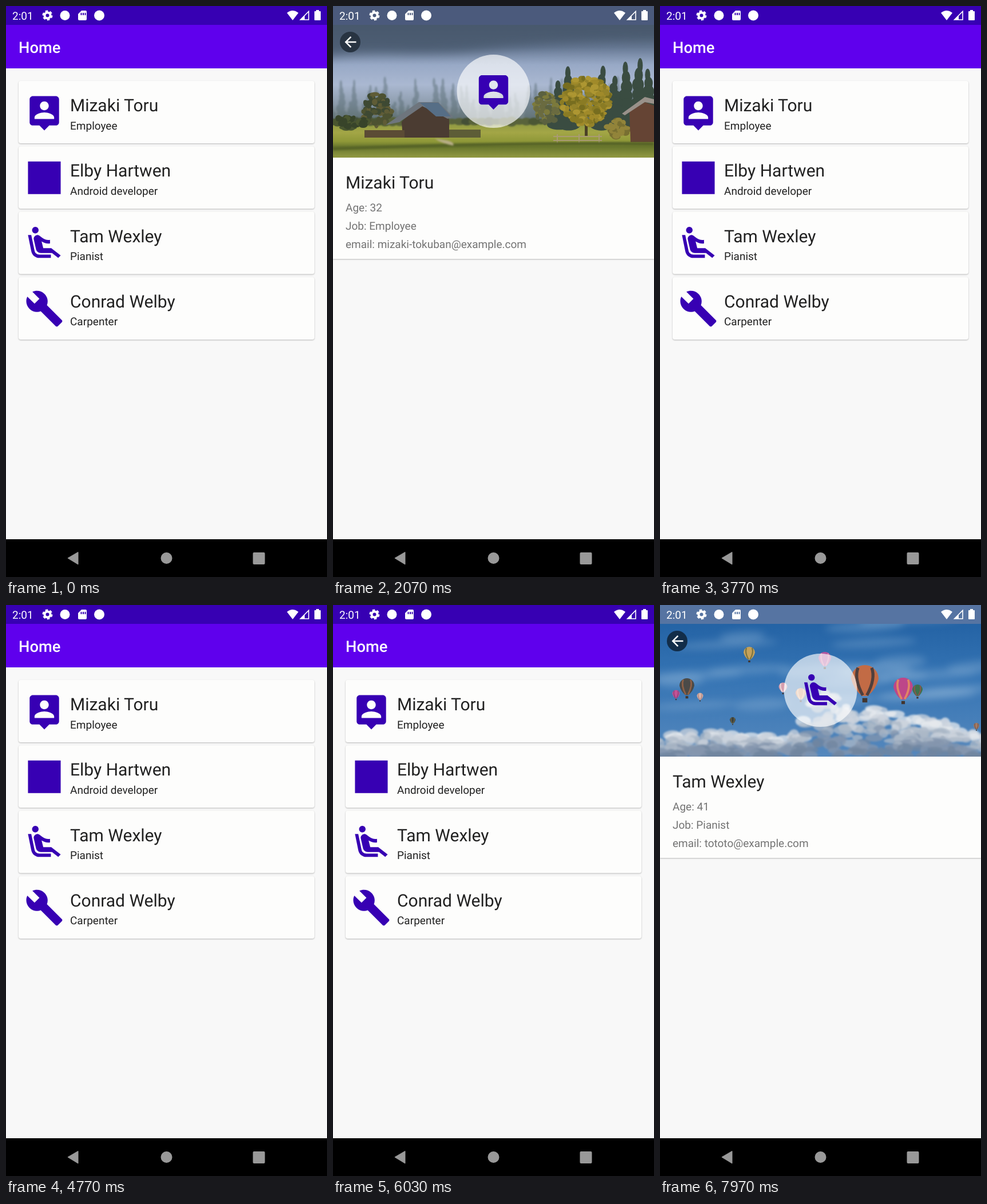
These frames come from a looping animation (561x998 px, 8 s). An HTML page:

```html
<!DOCTYPE html>
<html lang="en">
<head>
<meta charset="utf-8">
<title>Home</title>
<style>
  html, body { margin: 0; width: 100%; height: 100%; overflow: hidden; background: #000; }
  svg { display: block; width: 100%; height: 100%; }
  text { font-family: Roboto, sans-serif; font-size: 19px; fill: #212121; text-rendering: geometricPrecision; }
  .name { font-size: 30px; }
  .info { fill: #737373; }
  .card { fill: #fdfdfc; filter: drop-shadow(0 1.2px 1px #0004); }
  .icon { fill: #3700b3; }
</style>
</head>
<body>
<svg id="stage" viewBox="0 0 561 998" preserveAspectRatio="none"></svg>
<script>
const LOOP = 8000, FADE = 220, ROW = 114.3;

const people = [
  { name: 'Mizaki Toru', job: 'Employee', age: 32, mail: 'mizaki-tokuban', bar: '#4b5a7c', back: '#283442', photo: valley,
    icon: 'M19 2H5c-1.11 0-2 .9-2 2v14c0 1.1.9 2 2 2h4l3 3 3-3h4c1.1 0 2-.9 2-2V4c0-1.1-.9-2-2-2zm-7 3.3c1.49 0 2.7 1.21 2.7 2.7 0 1.49-1.21 2.7-2.7 2.7-1.49 0-2.7-1.21-2.7-2.7 0-1.49 1.21-2.7 2.7-2.7zM18 16H6v-.9c0-2 4-3.1 6-3.1s6 1.1 6 3.1v.9z' },
  { name: 'Elby Hartwen', job: 'Android developer', age: 25, mail: 'elolo', bar: '#6b5857', back: '#72706f', photo: desk,
    icon: 'M2 2h20v20H2z' },
  { name: 'Tam Wexley', job: 'Pianist', age: 41, mail: 'tototo', bar: '#5674a2', back: '#122d49', photo: sky,
    icon: 'M5.35 5.64c-.9-.64-1.12-1.88-.49-2.79.63-.9 1.88-1.12 2.79-.49.9.64 1.12 1.88.49 2.79-.64.9-1.88 1.12-2.79.49zM16 19H8.93c-1.48 0-2.74-1.08-2.96-2.54L4 7H2l1.99 9.76C4.37 19.2 6.47 21 8.94 21H16v-2zm.23-4h-4.88l-1.03-4.1c1.58.89 3.28 1.54 5.15 1.22V9.99c-1.63.31-3.44-.27-4.69-1.25L9.14 7.47c-.23-.18-.49-.3-.76-.38-.32-.09-.66-.12-.99-.06h-.02c-1.23.22-2.05 1.39-1.84 2.61l1.35 5.92C7.16 16.98 8.39 18 9.83 18h6.85l3.82 3 1.5-1.5-5.77-4.5z' },
  { name: 'Conrad Welby', job: 'Carpenter',
    icon: 'M22.7 19l-9.1-9.1c.9-2.3.4-5-1.5-6.9-2-2-5-2.4-7.4-1.3L9 6 6 9 1.6 4.7C.4 7.1.9 10.1 2.9 12.1c1.9 1.9 4.6 2.4 6.9 1.5l9.1 9.1c.4.4 1 .4 1.4 0l2.3-2.3c.5-.4.5-1.1.1-1.4z' }
];

// Detail page visits: person, opening time, closing time
const visits = [[0, 1820, 3510], [1, 4840, 5440], [2, 7130, Infinity]];

let seed = 7;
const rnd = (a, b) => {
  seed = (seed * 16807) % 2147483647;
  return a + (b - a) * seed / 2147483647;
};
const many = (n, f) => Array.from({ length: n }, (_, i) => f(i)).join('');
const rect = (x, y, w, h, fill, more = '') => `<rect x="${x}" y="${y}" width="${w}" height="${h}" fill="${fill}" ${more}/>`;
const oval = (x, y, rx, ry, fill, more = '') => `<ellipse cx="${x}" cy="${y}" rx="${rx}" ry="${ry}" fill="${fill}" ${more}/>`;
const path = (d, fill, more = '') => `<path d="${d}" fill="${fill}" ${more}/>`;
const text = (x, y, s, cls = '', more = '') => `<text x="${x}" y="${y}" class="${cls}" ${more}>${s}</text>`;
const gradient = (id, ...stops) => `<linearGradient id="${id}" x2="0" y2="1">` +
  stops.map(([at, c]) => `<stop offset="${at}" stop-color="${c}"/>`).join('') + '</linearGradient>';
const blur = (r, s) => `<g style="filter:blur(${r}px)">${s}</g>`;
const pick = list => list[Math.floor(rnd(0, list.length))];
const place = (x, y, k = 2.857) => `translate(${x - 12 * k} ${y - 12 * k}) scale(${k})`;
const rowIcon = i => [67, 186 + ROW * i];

function valley() {
  const fir = (x, y, w, h, c) => many(7, i => oval(x + rnd(-2, 2), y - h + (i + .6) * h / 7, w * (.1 + i * .06), h / 9, c));
  const bush = (x, y, w, h, colors, n) => many(n, () => {
    const a = rnd(0, 6.28), r = Math.sqrt(rnd(0, 1));
    return oval(x + Math.cos(a) * r * w, y + Math.sin(a) * r * h, rnd(3, 8), rnd(3, 6), pick(colors));
  });
  return gradient('fog', [0, '#526278'], [.17, '#687a95'], [.3, '#98a9c6'], [.45, '#aab8d1'], [.6, '#8c9bab'], [.76, '#66736c']) +
    gradient('grass', [0, '#8b9641'], [.3, '#a3a646'], [.55, '#8f9838'], [.7, '#68762d'], [1, '#929a42']) +
    rect(0, 33, 561, 232, 'url(#fog)') +
    blur(9, path('M-30 0H600V62Q500 60 400 66T250 78T110 82T-30 92Z', '#47576b', 'opacity=".8"')) +
    blur(1.5, `<g opacity=".45">${many(45, i => fir(i * 13 + rnd(-5, 5), 204, rnd(16, 26), rnd(30, 82), '#53666d'))}</g>`) +
    rect(0, 202, 561, 63, 'url(#grass)') +
    blur(1, many(45, i => oval(i * 13, 202, 10, rnd(4, 9), pick(['#4b5734', '#59633b', '#444f36'])))) +
    blur(.7,
      [[410, 104], [395, 80], [512, 112], [535, 118], [492, 88], [551, 100], [470, 105]].map(([x, h]) => fir(x, 212, 46, h, '#3a4c41')).join('') +
      bush(373, 180, 20, 28, ['#6a6b40', '#7c7a3c', '#5b6140'], 70) +
      bush(76, 182, 24, 28, ['#4d5231', '#5f5c36', '#3e4933'], 80) +
      bush(28, 204, 32, 11, ['#38442a', '#4a5630'], 45) +
      rect(440, 195, 5, 32, '#4b4126') +
      bush(442, 166, 43, 42, ['#8a7b24', '#a08a2a', '#776d1f', '#ad9632', '#94832a'], 260) +
      bush(497, 214, 18, 15, ['#92843a', '#786f31'], 40)) +
    path('M120 203L150 172L203 198V230H122Z', '#4b3c32') +
    path('M92 208L150 168H184L210 194L200 197L158 174L116 203Z', '#6e757d') +
    path('M152 169H184L206 193H180Z', '#566e86') +
    rect(55, 217, 70, 13, '#5b4b35') + rect(203, 216, 55, 14, '#5d5d37') +
    path('M518 185L545 168L561 174V238H520Z', '#654434') +
    path('M505 188L545 159L561 163V171L545 168L510 191Z', '#99918a') +
    path('M385 228H470M385 235H470M392 224V240M430 224V240M465 224V240', 'none', 'stroke="#aa9b73" stroke-width="2"') +
    blur(1.5, path('M0 247Q300 236 561 238V244Q300 241 0 252Z', '#566327') +
      path('M178 232Q215 235 210 244Q190 240 178 232Z', '#b7ad86'));
}

function desk() {
  const grain = (n, light) => many(n, () => rect(rnd(-60, 540), rnd(33, 265), rnd(20, 110), rnd(.6, 2), light ? pick(['#6d544a', '#775c50', '#5c473f']) : pick(['#2b2122', '#352a29']), 'opacity=".55"'));
  return rect(0, 33, 561, 232, '#46362f') +
    blur(.5, grain(220, false) + grain(200, true)) +
    many(6, i => rect(0, 55 + i * 39, 561, 2, '#231b1c')) +
    blur(22, path('M-60 0H620V300H-60ZM60 60V245H500V60Z', '#150f10', 'fill-rule="evenodd" opacity=".4"')) +
    path('M0 33H77L99 119Q101 127 94 132L0 181Z', '#a1a0a1') +
    path('M0 33H74L96 116Q98 123 91 127L0 174Z', '#f0f0f2') +
    path('M0 177L62 207L36 265H0Z', '#1f2023') + path('M0 177L62 207L58 215L0 188Z', '#36383c') +
    path('M411 42L424 33H537L516 100Q465 82 411 48Z', '#1d1f22') +
    path('M411 42L516 92L514 100L411 50Z', '#a7a39e') +
    oval(485, 56, 32, 32, '#141619') + oval(485, 56, 23, 23, '#2c3238') + oval(485, 56, 14, 14, '#121519') +
    path('M537 33H555L549 47L534 43Z', '#4f9ac2') +
    oval(546, 98, 19, 20, '#121315') + oval(546, 98, 14, 15, '#1c1d20') +
    `<g fill="#62554f66" stroke="#171719" stroke-width="4">
      <rect x="464" y="193" width="37" height="25" rx="10" transform="rotate(18 482 205)"/>
      <rect x="512" y="214" width="40" height="26" rx="10" transform="rotate(18 532 227)"/>
      <path d="M500 214Q508 211 514 220M463 198L459 207M466 190Q515 187 556 216" fill="none" stroke-width="2.5"/></g>` +
    rect(168, 255, 190, 20, '#fafafa', 'rx="5"') + path('M498 265Q511 254 520 265Z', '#f3f2f2');
}

function sky() {
  const balloon = ([x, y, r, c, stripe]) =>
    path(`M${x - r} ${y}a${r} ${r} 0 0 1 ${2 * r} 0Q${x + r * .8} ${y + r * .8} ${x + r * .2} ${y + r * 1.25}h${-r * .4}Q${x - r * .8} ${y + r * .8} ${x - r} ${y}Z`, c) +
    path(`M${x - r * .5} ${y - r * .8}Q${x - r * .8} ${y} ${x - r * .15} ${y + r * 1.2}M${x + r * .5} ${y - r * .8}Q${x + r * .8} ${y} ${x + r * .15} ${y + r * 1.2}`, 'none', `stroke="${stripe}" stroke-width="${r * .22}"`) +
    rect(x - r * .18, y + r * 1.4, r * .36, r * .32, '#42352e');
  const bump = (x, at, h, w) => h * Math.exp(-(((x - at) / w) ** 2));
  const top = x => 222 - bump(x, 292, 84, 42) - bump(x, 380, 46, 45) - bump(x, 470, 30, 60) - bump(x, 80, 10, 60);
  const shades = ['#e6e9ed', '#ccd3dc', '#acb8c7', '#8496ae', '#71869f'];
  return gradient('air', [0, '#2463a5'], [.4, '#3574b4'], [1, '#5588bd']) +
    rect(0, 33, 561, 232, 'url(#air)') +
    blur(7, many(22, () => oval(rnd(0, 561), rnd(45, 190), rnd(35, 95), rnd(5, 12), '#9fc0de', 'opacity=".3" transform="rotate(-3)"'))) +
    blur(1.5, many(420, i => {
      const x = rnd(-10, 571), depth = i / 420, y = top(x) + 8 + depth * (258 - top(x));
      return oval(x, y, rnd(6, 17), rnd(4, 10), shades[Math.min(4, Math.floor(depth * 4 + rnd(0, 1.4)))], 'opacity=".75"');
    })) +
    [[156, 83, 10, '#c4a15a', '#7c733e'], [47, 141, 13, '#4b4a48', '#8d6047'], [28, 155, 6.5, '#c25295', '#863e78'],
     [70, 159, 5.5, '#d9b4a8', '#a97c7c'], [127, 201, 5, '#3d423d', '#7b7049'], [288, 93, 11, '#b1569f', '#d07ea9'],
     [215, 143, 7.5, '#d69eae', '#ebe0e0'], [246, 154, 9, '#d69872', '#e7c29d'], [358, 129, 24, '#c26b45', '#4f3f3d'],
     [425, 144, 17, '#bd4689', '#e18565'], [450, 148, 9, '#3f714c', '#8a5550'], [553, 211, 5, '#a17a65', '#714f48']].map(balloon).join('');
}

const home = () => rect(0, 0, 561, 998, '#f8f8f8') + rect(0, 0, 561, 33, '#3700b3') + rect(0, 33, 561, 76, '#5f00ed') +
  text(22, 81.5, 'Home', '', 'style="font-size:27.3px;font-weight:500;fill:#fff"') +
  people.map((p, i) => {
    const y = ROW * i;
    return rect(22, 131 + y, 517, 109, '', 'rx="4" class="card"') +
      text(112, 184 + y, p.name, 'name') + text(112, 215.5 + y, p.job) +
      path(p.icon, '', `class="icon" id="icon${i}" transform="${place(...rowIcon(i))}"`);
  }).join('');

const detail = (p, i) => `<g id="page${i}">` + rect(0, 0, 561, 998, '#f8f8f8') +
  `<g clip-path="url(#header)">${p.photo()}</g>` + rect(0, 0, 561, 33, p.bar) +
  oval(280.5, 149, 64, 64, '#fff', 'opacity=".65"') +
  oval(30, 63, 18, 18, p.back) +
  path('M20 11H7.83l5.59-5.59L12 4l-8 8 8 8 1.41-1.41L7.83 13H20v-2z', '#fff', `transform="${place(30.5, 63, 1.25)}"`) +
  rect(0, 265, 561, 177, '', 'class="card"') +
  text(22, 319, p.name, 'name') + text(22, 359, 'Age: ' + p.age, 'info') +
  text(22, 391, 'Job: ' + p.job, 'info') + text(22, 423, `email: ${p.mail}@example.com`, 'info') + '</g>';

const system = () => text(11, 24, '2:01', '', 'style="fill:#fff"') +
  `<g fill="none" stroke="#fff"><circle cx="72.5" cy="16.5" r="5" stroke-width="4"/>
    <circle cx="72.5" cy="16.5" r="7.5" stroke-width="3" stroke-dasharray="4.4 3.454"/></g>` +
  oval(103, 16.5, 8.5, 8.5, '#fff') +
  path('M132 8H139Q141 8 141 10V23Q141 25 139 25H128Q126 25 126 23V14ZM130.5 12v4h2v-4zm3.5 0v4h2v-4zm3.5 0v4h2v-4z', '#fff', 'fill-rule="evenodd"') +
  oval(163, 16.5, 9, 9, '#fff') +
  path('M501 25L491 12Q501 4 511 12Z', '#fff') +
  path('M514.5 24L529 9.5V24Z', 'none', 'stroke="#fff" stroke-width="1.6"') + path('M514 24L522 16.5V24Z', '#fff') +
  path('M542 9V7H547V9H549Q550 9 550 10V24Q550 25 549 25H540Q539 25 539 24V10Q539 9 540 9Z', '#fff') +
  rect(0, 932, 561, 66, '#000') + path('M108 965L126 954.5V976Z', '#999', 'stroke="#999" stroke-linejoin="round"') +
  oval(280.5, 965, 10, 10, '#999') + rect(431.5, 955, 21, 21, '#999', 'rx="2"');

const $ = id => document.getElementById(id);
$('stage').innerHTML = '<clipPath id="header"><rect y="33" width="561" height="232"/></clipPath>' +
  home() + people.slice(0, 3).map(detail).join('') + '<path id="flyer" class="icon"/>' + system();

const ease = x => {
  x = Math.max(0, Math.min(1, x));
  return x * x * (3 - 2 * x);
};

function draw(now) {
  const t = now % LOOP;
  let active = -1, shown = 0;
  for (const [i, open, close] of visits) {
    const p = ease((t - open) / FADE) - ease((t - close) / FADE);
    $('page' + i).setAttribute('opacity', p);
    $('page' + i).style.display = p ? '' : 'none';
    $('icon' + i).style.display = p ? 'none' : '';
    if (p) [active, shown] = [i, p];
  }
  const flyer = $('flyer');
  flyer.style.display = active < 0 ? 'none' : '';
  if (active >= 0) {
    const [x, y] = rowIcon(active);
    flyer.setAttribute('d', people[active].icon);
    flyer.setAttribute('transform', place(x + (280.5 - x) * shown, y + (149.5 - y) * shown));
  }
  requestAnimationFrame(draw);
}
requestAnimationFrame(draw);
</script>
</body>
</html>
```
